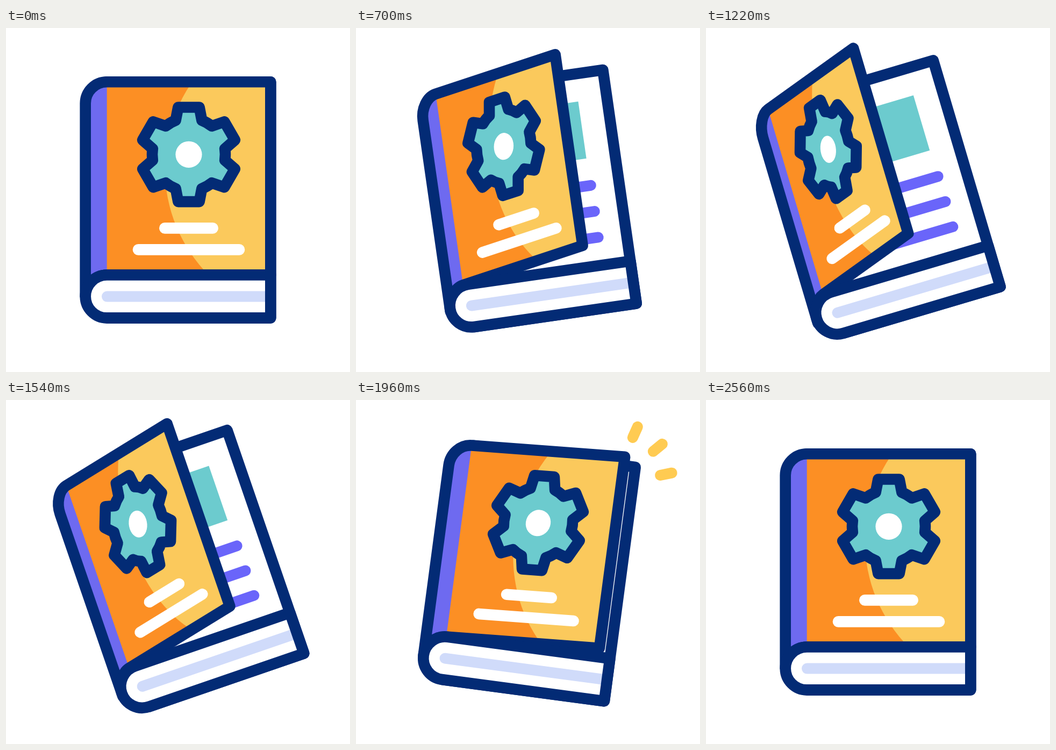
Animation of 640 by 640 pixels, one loop 3 s. Source, as an HTML page with a canvas:

```html
<!DOCTYPE html>
<html lang="en">
<head>
<meta charset="utf-8">
<title>Book</title>
<style>
  html, body { margin: 0; height: 100%; overflow: hidden; background: #fff; }
  canvas { display: block; width: 100vw; height: 100vh; }
</style>
</head>
<body>
<canvas id="stage" width="640" height="640"></canvas>
<script>
const ctx = document.getElementById('stage').getContext('2d');
const LOOP = 3000, LINE = 20.6, DEG = Math.PI / 180;
const NAVY = '#032b75', ORANGE = '#fc8f24', YELLOW = '#fbc95c', TEAL = '#6ccbce';
const SPINE = '#6e6af0', TEXT = '#6a65fa', PAPER = '#d0dbfa', SPARK = '#ffcb52';
const LEFT = 147.7, FOLD = 187.7, RIGHT = 492.3, TOP = 100.3, BAND = 459.5, BOTTOM = 539.4;

// Monotone cubic curve through [time, value] keys, flat at both ends.
function track(...keys) {
  const slope = i => (keys[i + 1][1] - keys[i][1]) / (keys[i + 1][0] - keys[i][0]);
  const tangent = i => {
    if (i === 0 || i === keys.length - 1) return 0;
    const a = slope(i - 1), b = slope(i);
    return a * b <= 0 ? 0 : 2 * a * b / (a + b);
  };
  return t => {
    if (t <= keys[0][0]) return keys[0][1];
    const n = keys.findIndex(k => k[0] > t);
    if (n < 0) return keys[keys.length - 1][1];
    const [t0, a] = keys[n - 1], [t1, b] = keys[n];
    const h = t1 - t0, u = (t - t0) / h, v = 1 - u;
    return a * v * v * (1 + 2 * u) + b * u * u * (3 - 2 * u)
      + h * u * v * (tangent(n - 1) * v - tangent(n) * u);
  };
}

const tilt = track([220, 0], [380, -1.5], [700, -8.15], [740, -9.35], [800, -10.8], [1220, -16.5],
  [1280, -17.35], [1500, -19.2], [1540, -19], [1700, -11], [1820, 2], [1900, 9], [1960, 7.6],
  [2200, -4.6], [2370, -1.6], [2560, 0]);
const pull = track([220, 0], [380, 17], [700, 83.5], [740, 94], [820, 109], [1220, 136],
  [1290, 137], [1540, 102], [1820, 34], [1960, 22], [2160, 0]);
const lift = track([220, 0], [380, 8], [700, 41], [740, 45.5], [820, 52], [1220, 64],
  [1290, 64.5], [1540, 48], [1820, 22], [1960, 16.5], [2160, 0]);
const sparkTip = track([1740, -24], [1820, -4], [1960, 0]);
const sparkTail = track([1840, -24], [1960, -22], [2280, 0]);
const sparks = [[486.5, 25.4, -73.4], [536.3, 51, -46.6], [561, 102, -19]];

function stroke(color, width = LINE) {
  ctx.strokeStyle = color;
  ctx.lineWidth = width;
  ctx.stroke();
}

function fill(color) {
  ctx.fillStyle = color;
  ctx.fill();
}

// Builds a path under a transform, so that line weights stay even.
function shape(matrix, build) {
  ctx.beginPath();
  ctx.save();
  if (matrix) ctx.transform(...matrix);
  build();
  ctx.restore();
}

function line(matrix, x0, y0, x1, y1, color, width) {
  shape(matrix, () => { ctx.moveTo(x0, y0); ctx.lineTo(x1, y1); });
  stroke(color, width);
}

function drawPage() {
  shape(null, () => ctx.rect(FOLD, TOP, RIGHT - FOLD, BOTTOM - TOP));
  fill('#fff');
  stroke(NAVY);
  ctx.fillStyle = TEAL;
  ctx.fillRect(241, 152, 197.5, 107);
  for (const y of [309.7, 358.5, 407.3]) line(null, 241, y, 439.5, y, TEXT, 20);
}

function gearPath() {
  for (let i = 0; i < 6; i++) {
    const turn = i * 60;
    const point = (r, a) => {
      const angle = (turn + a - 90) * DEG;
      ctx.lineTo(r * Math.cos(angle), r * Math.sin(angle));
    };
    point(90, -12.6);
    point(90, 12.6);
    ctx.arc(0, 0, 68, (turn + 21 - 90) * DEG, (turn + 39 - 90) * DEG);
  }
  ctx.closePath();
}

function drawCover(dx, dy) {
  const sx = 1 - dx / (RIGHT - LEFT), shear = -dy / (RIGHT - FOLD);
  const m = [sx, shear, 0, 1, LEFT * (1 - sx), -shear * FOLD];
  const outline = () => shape(m, () => {
    ctx.moveTo(LEFT, BAND + 40);
    ctx.arcTo(LEFT, TOP, FOLD, TOP, 40);
    ctx.lineTo(RIGHT, TOP);
    ctx.lineTo(RIGHT, BAND);
    ctx.lineTo(FOLD, BAND);
    ctx.arcTo(LEFT, BAND, LEFT, BAND + 40, 40);
    ctx.closePath();
  });

  ctx.save();
  outline();
  ctx.clip();
  fill(ORANGE);
  shape(m, () => ctx.arc(577, 261.7, 281.4, 0, 7));
  fill(YELLOW);
  shape(m, () => ctx.rect(LEFT - 20, 60, FOLD - LEFT + 20, 480));
  fill(SPINE);
  ctx.restore();
  outline();
  stroke(NAVY);

  const x = m[0] * 340 + m[4] - 0.045 * dx, y = m[1] * 340 + 235.3 + m[5];
  const gear = [sx, shear, 0, 1, x, y];
  shape(gear, gearPath);
  fill(TEAL);
  stroke(NAVY);
  shape(gear, () => ctx.arc(0, 0, 24.6, 0, 7));
  fill('#fff');

  line(m, 295.3, 372.4, 384.7, 372.4, '#fff');
  line(m, 246, 412.4, 434, 412.4, '#fff');
}

function drawBlock() {
  const outline = () => shape(null, () => {
    ctx.moveTo(RIGHT, BOTTOM);
    ctx.lineTo(FOLD, BOTTOM);
    ctx.arc(FOLD, (BAND + BOTTOM) / 2, (BOTTOM - BAND) / 2, Math.PI / 2, -Math.PI / 2);
    ctx.lineTo(RIGHT, BAND);
    ctx.closePath();
  });
  outline();
  fill('#fff');
  line(null, 188, 499.6, 484, 499.6, PAPER, 20);
  outline();
  stroke(NAVY);
}

function drawSparks(t) {
  if (t < 1740 || t > 2280) return;
  const tip = sparkTip(t), tail = sparkTail(t);
  for (const [x, y, angle] of sparks) {
    const c = Math.cos(angle * DEG), s = Math.sin(angle * DEG);
    line(null, x + tail * c, y + tail * s, x + tip * c, y + tip * s + 0.01, SPARK, 20);
  }
}

function draw(now) {
  const t = now % LOOP;
  ctx.setTransform(1, 0, 0, 1, 0, 0);
  ctx.fillStyle = '#fff';
  ctx.fillRect(0, 0, 640, 640);
  ctx.lineCap = ctx.lineJoin = 'round';
  ctx.translate(320, 320);
  ctx.rotate(tilt(t) * DEG);
  ctx.translate(-320, -320);
  drawPage();
  drawCover(pull(t), lift(t));
  drawBlock();
  drawSparks(t);
}

const start = performance.now();
function tick() {
  draw(performance.now() - start);
  requestAnimationFrame(tick);
}
tick();
</script>
</body>
</html>
```
